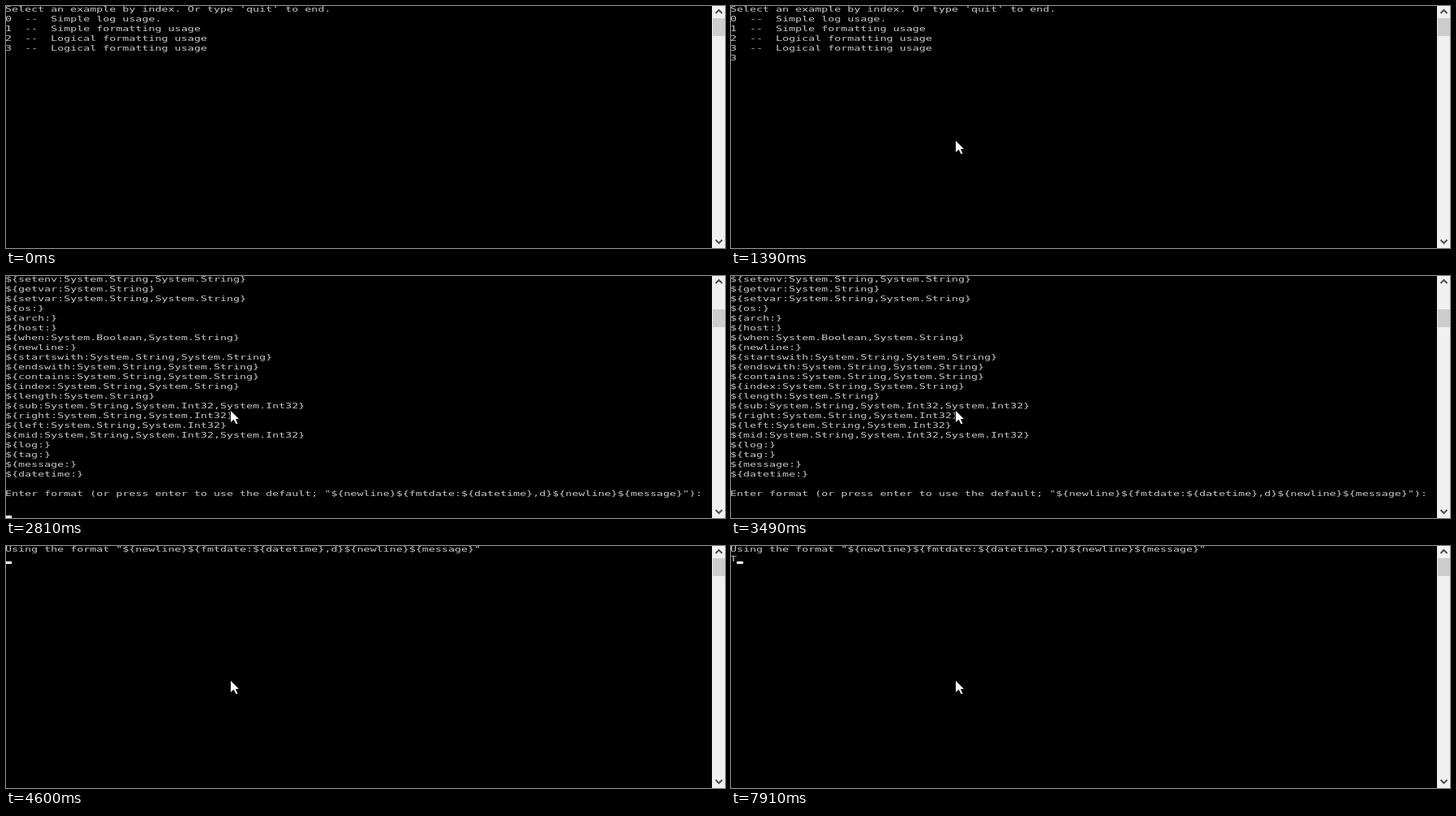
These frames come from a looping animation (883 by 298 pixels, 8 s). An HTML page with a canvas:

```html
<!DOCTYPE html>
<html lang="en">
<head>
<meta charset="utf-8">
<title>Console</title>
<style>
  html, body { margin: 0; width: 100%; height: 100%; overflow: hidden; background: #000; }
  canvas { display: block; }
</style>
</head>
<body>
<canvas width="883" height="298"></canvas>
<script>
const ctx = document.querySelector('canvas').getContext('2d');
const LOOP = 8000, COL = 8, ROW = 12;

const format = '"${newline}${fmtdate:${datetime},d}${newline}${message}"';

const menu = [
  "Select an example by index. Or type 'quit' to end.",
  '0  --  Simple log usage.',
  '1  --  Simple formatting usage',
  '2  --  Logical formatting usage',
  '3  --  Logical formatting usage'
];

// S, I and B stand for the argument types
const types = { S: 'System.String', I: 'System.Int32', B: 'System.Boolean' };
const help = ('setenv:SS getvar:S setvar:SS os: arch: host: when:BS newline: ' +
  'startswith:SS endswith:SS contains:SS index:SS length:S sub:SII right:SI ' +
  'left:SI mid:SII log: tag: message: datetime:').split(' ').map(entry => {
    const [name, args] = entry.split(':');
    return '${' + name + ':' + [...args].map(a => types[a]).join(',') + '}';
  });
help.push('', 'Enter format (or press enter to use the default; ' + format + '):');

const result = ['Using the format ' + format];

// start time, lines, caret column and row, top of scroll thumb
const scenes = [
  [0, menu, 0, 5, 15],
  [1280, [...menu, '3'], 1, 5, 15],
  [2810, help, 0, 24, 41],
  [4600, result, 0, 1, 15],
  [7910, [...result, 'T'], 1, 1, 15]
];
const caretFlips = [860, 1390, 1900, 2440, 2810, 3490, 3980, 4540,
  4600, 5590, 6060, 6620, 7110, 7670, 7910];

function rect(color, x, y, w, h) {
  ctx.fillStyle = color;
  ctx.fillRect(x, y, w, h);
}

function path(points) {
  ctx.beginPath();
  points.forEach(([x, y]) => ctx.lineTo(x, y));
}

// Wide 8 x 12 console cells
function drawText(lines) {
  ctx.save();
  ctx.font = '96px "DejaVu Sans Mono", monospace';
  ctx.fillStyle = '#c8c8c8';
  const sx = COL / ctx.measureText('0').width;
  lines.forEach((line, i) => {
    ctx.setTransform(sx, 0, 0, 0.1, -1, i * ROW + 7);
    ctx.fillText(line, 0, 0);
  });
  ctx.restore();
}

function chevron(y, dir) {
  path([[871.5, y + 2 * dir], [875.5, y - 2 * dir], [879.5, y + 2 * dir]]);
  ctx.strokeStyle = '#505050';
  ctx.lineWidth = 2;
  ctx.stroke();
}

function drawScrollbar(top) {
  rect('#f0f0f0', 867, 0, 16, 298);
  rect('#cdcdcd', 868, top, 15, 22);
  chevron(7, 1);
  chevron(290, -1);
}

function pointerAt(t) {
  if (t >= 620) return [276, 166];
  if (t >= 380) return [276, 165];
  const step = Math.min(3, Math.floor((t - 60) / 46));
  const rest = (1 - step / 3) ** 1.4;
  return [Math.round(277 + 411 * rest), Math.round(165 + 116 * rest)];
}

function drawPointer(t) {
  if (t < 60) return;
  ctx.save();
  ctx.translate(...pointerAt(t));
  path([[0, 0], [10, 10], [6, 10], [8.5, 16], [6.3, 16], [3.7, 10.7], [0, 14]]);
  ctx.closePath();
  ctx.strokeStyle = '#000';
  ctx.lineWidth = 2;
  ctx.stroke();
  ctx.fillStyle = '#fff';
  ctx.fill();
  ctx.restore();
}

function draw(now) {
  const t = now % LOOP;
  const [, lines, col, row, thumb] = scenes.filter(s => s[0] <= t).pop();
  const caretOn = t >= 1280 && t < 1390 ||
    caretFlips.filter(f => f <= t).length % 2 === 1;
  rect('#000', 0, 0, 883, 298);
  drawText(lines);
  if (caretOn) rect('#fff', col * COL - 1, row * ROW + 7, COL, 3);
  drawScrollbar(thumb);
  drawPointer(t);
  requestAnimationFrame(draw);
}
requestAnimationFrame(draw);
</script>
</body>
</html>
```
